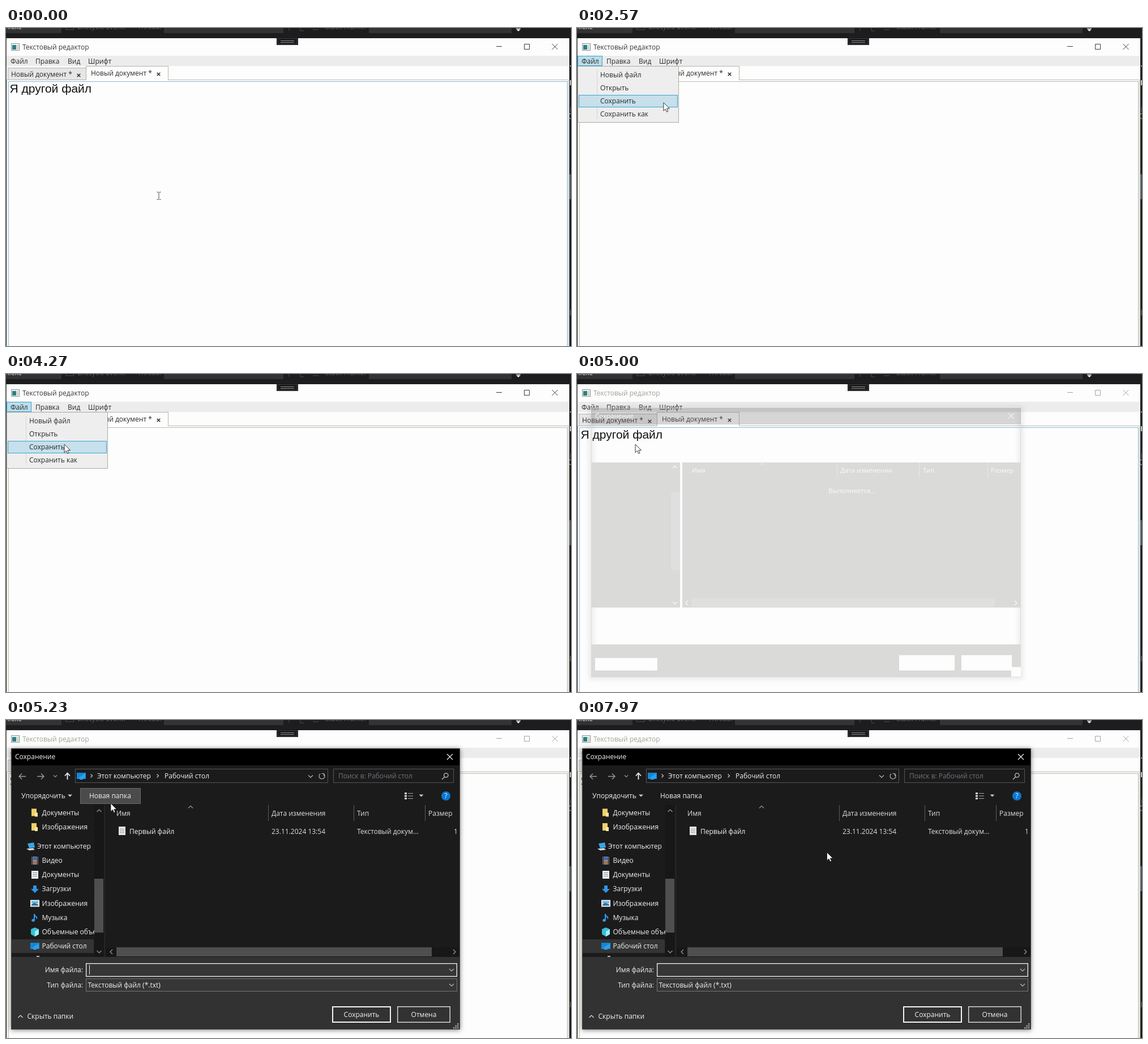
These frames come from a looping animation (998x561 px, 8000 ms). An HTML page:

```html
<!DOCTYPE html>
<html lang="ru">
<head>
<meta charset="utf-8">
<title>Текстовый редактор</title>
<style>
html, body { margin: 0; width: 100%; height: 100%; overflow: hidden; background: #1d1d1f; }
svg { display: block; position: absolute; left: 0; top: 0; }
text { font-family: "Open Sans", "Noto Sans", sans-serif; white-space: pre; }
.doc { font-family: "Liberation Sans", Arial, sans-serif; }
</style>
</head>
<body>
<svg id="stage" width="998" height="561" viewBox="0 0 998 561"></svg>
<script>
const LOOP = 8000;
const MENU_OPEN = 1730, MENU_CLOSE = 4640, DIALOG = 4930, READY = 5050, SHOWN = 5200;

const rect = (x, y, w, h, fill, stroke, sw = 1) => stroke
  ? `<rect x="${x + sw / 2}" y="${y + sw / 2}" width="${w - sw}" height="${h - sw}" fill="${fill}" stroke="${stroke}" stroke-width="${sw}"/>`
  : `<rect x="${x}" y="${y}" width="${w}" height="${h}" fill="${fill}"/>`;
const path = (d, stroke, sw = 1, fill = 'none') =>
  `<path d="${d}" fill="${fill}" stroke="${stroke}" stroke-width="${sw}"/>`;
const shape = (d, fill) => `<path d="${d}" fill="${fill}"/>`;
// cy is the vertical middle of the line
const text = (x, cy, s, fill, anchor = 'start', size = 12) =>
  `<text x="${x}" y="${Math.round(cy + 4.2)}" fill="${fill}" font-size="${size}" text-anchor="${anchor}">${s}</text>`;
const group = (id, body) => `<g id="${id}">${body}</g>`;
const cross = (x, y, r, c, sw = 1) => path(`M${x - r} ${y - r}l${2 * r} ${2 * r}m0 ${-2 * r}l${-2 * r} ${2 * r}`, c, sw);
const chevron = (x, y, dir, c, r = 4, sw = 1.2) => path({
  up: `M${x - r} ${y + r / 2}l${r} ${-r}l${r} ${r}`,
  down: `M${x - r} ${y - r / 2}l${r} ${r}l${r} ${-r}`,
  left: `M${x + r / 2} ${y - r}l${-r} ${r}l${r} ${r}`,
  right: `M${x - r / 2} ${y - r}l${r} ${r}l${-r} ${r}`
}[dir], c, sw);
const triangle = (x, y, c) => shape(`M${x - 4} ${y - 2}h8l-4 4z`, c);

const MENUS = [['Файл', 8, 1, 44], ['Правка', 52, 45, 57], ['Вид', 109, 102, 36], ['Шрифт', 145, 138, 55]];
const ITEMS = ['Новый файл', 'Открыть', 'Сохранить', 'Сохранить как'];
const itemY = i => 72 + 23 * i;

function backdrop() {
  const label = (x, s, c, anchor) => text(x, -2.5, s, c, anchor);
  return rect(0, 0, 998, 561, '#1d1d1f') +
    rect(0, 0, 98, 9, '#333336') + rect(279, 0, 211, 9, '#333336') + rect(641, 0, 252, 9, '#333336') +
    label(28, 'n.exe', '#e6e6e6', 'end') + label(126, 'Lifecycle Event.', '#5c5c5c') +
    label(232, 'Thread:', '#5c5c5c') + label(564, 'Stack Frame:', '#5c5c5c') +
    path('M105.5 0v3h14v-3M542 3h10M500 0v5M520 0v5h6', '#4c4c4c') +
    rect(901, 0, 8, 1, '#ddd') + triangle(905, 4, '#eee') +
    rect(995, 258, 3, 44, '#4d5c62') + rect(996, 92, 2, 9, '#c8c8c8') +
    rect(996, 66, 2, 2, '#999') + path('M998 151a4 4 0 0 0 0 9', '#c9c1a8') +
    rect(997, 140, 1, 8, '#7b3f8c') + rect(996, 497, 2, 10, '#4a4a4a');
}

function mainWindow() {
  const tab = (x, y, w, h, fill, tx, cy) => rect(x, y, w, h, fill, '#b4b6aa') +
    text(tx, cy, 'Новый документ *', '#2a2a2a') + cross(tx + 119.5, cy + 2, 2.8, '#222', 1.4);
  return rect(0, 18, 995, 543, '#fdfdfd') +
    rect(9, 27, 15, 13, '#f4f6f4', '#8a9292') + rect(11, 30, 7, 8, '#2c7f86') + rect(19, 30, 3, 8, '#c5d8c8') +
    `<g id="title">${text(29, 33.5, 'Текстовый редактор', 'currentColor')}` +
    path('M866 32.5h10M915.5 28.5h9v9h-9zM964.5 28l10 10m0-10l-10 10', 'currentColor') + '</g>' +
    rect(1, 49, 994, 18, '#ececec') +
    MENUS.map(([s, x, bx, w], i) => group('head' + i, rect(bx, 49, w, 18, '#bcdce9', '#3ba3cf')) +
      text(x, 59, s, '#2a2a2a')).join('') +
    path('M1.5 561V91.5H993.5V561', '#b9bbae') +
    tab(3, 70, 139, 22, '#e6e6e6', 9, 81.5) +
    tab(141, 67, 146, 25, '#fdfdfd', 150, 79.5) + rect(142, 91, 144, 1, '#fdfdfd') +
    '<rect id="edit" x="4.5" y="94.5" width="987" height="480" fill="#fdfdfd"/>' +
    '<text class="doc" x="6.5" y="114" font-size="21" fill="#111">Я другой файл</text>' +
    group('caret', rect(151, 96, 1, 23, '#111')) +
    rect(0, 18, 1, 543, '#4a4a4a') +
    rect(478, 17, 38, 13, '#161618') + rect(479, 18, 36, 11, '#1c1c1e', '#3c3c40') +
    path('M485 22.5h24M485 25.5h24', '#8b8b8b');
}

function dropDown() {
  return rect(1, 67, 179, 100, '#eeeeee', '#a9aba0') + rect(35, 74, 1, 87, '#d4d4e0') +
    ITEMS.map((s, i) => group('item' + i, rect(3, itemY(i), 175, 22, '#c6e0ec', '#3ba3cf')) +
      text(41, itemY(i) + 11, s, '#2a2a2a')).join('');
}

// half-painted dialog while it fades in
function ghost() {
  const w = '#fafafa', g = '#dadad9', bar = '#dfdfdf';
  const word = (x, y, s) => text(x, y, s, w, 'start', 11.5);
  return '<rect x="25" y="60" width="759" height="475" fill="none" stroke="#999" stroke-width="5" filter="url(#shadow)" opacity=".3"/>' +
    rect(25, 60, 759, 475, 'none', '#dedede') +
    '<rect x="25" y="60" width="759" height="29" fill="#777" opacity=".3"/>' +
    word(32, 74, 'Сохранение') + cross(767, 74, 5, w) +
    rect(25, 156, 157, 256, g) + rect(166, 209, 16, 137, bar) +
    chevron(173, 164, 'up', w) + chevron(173, 404, 'down', w) +
    rect(186, 156, 598, 256, g) + rect(202, 396, 536, 15, bar) +
    chevron(194, 404, 'left', w) + chevron(775, 404, 'right', w) + chevron(328, 159, 'up', '#e6e6e6') +
    path('M459.5 156v27M604.5 156v27M725.5 156v27', '#e8e8e8') +
    word(203, 170, 'Имя') + word(465, 170, 'Дата изменения') + word(611, 170, 'Тип') + word(731, 170, 'Размер') +
    word(444, 206, 'Выполняется...') +
    rect(25, 477, 759, 58, g) + rect(32, 501, 110, 22, '#fdfdfd') + rect(569, 496, 98, 27, '#fdfdfd') +
    rect(679, 496, 89, 27, '#fdfdfd') + rect(767, 517, 17, 17, '#fdfdfd');
}

const ICONS = {
  folder: (x, y) => shape(`M${x + 2} ${y - 7}h9v13h-9z`, '#f2cf68') + shape(`M${x + 8} ${y}h5v7h-5z`, '#ffe7a0'),
  pc: (x, y) => shape(`M${x + 1} ${y - 5}l11-2l2 9l-10 1z`, '#37a6e4') + shape(`M${x - 1} ${y + 4}l12-1l3 3l-10 1z`, '#d5dde3'),
  film: (x, y) => rect(x + 2, y - 7, 12, 14, '#8c8fa8') + rect(x + 5, y - 6, 6, 5, '#3b66b5') + rect(x + 5, y + 1, 6, 5, '#a8743a') +
    path(`M${x + 3.5} ${y - 7}v14M${x + 12.5} ${y - 7}v14`, '#26262c', 1.5),
  sheet: (x, y) => rect(x + 2, y - 7, 12, 14, '#e9edf0') + path(`M${x + 4} ${y - 3.5}h8m-8 3h8m-8 3h8`, '#7d93a8'),
  load: (x, y) => shape(`M${x + 5} ${y - 6}h6v6h4l-7 7l-7-7h4z`, '#2f95ea'),
  image: (x, y) => rect(x, y - 6, 16, 12, '#eef3f6') + rect(x + 2, y - 4, 12, 4, '#65b4e8') + shape(`M${x + 2} ${y + 4}v-2l5-3l7 3v2z`, '#2e6d98'),
  note: (x, y) => shape(`M${x + 6} ${y - 7}h2q0 3 4 5q1 3-1 5q0-4-3-5v6a3 2.5 0 1 1-2-2z`, '#2c9cf0'),
  cube: (x, y) => shape(`M${x + 8} ${y - 8}l7 3v9l-7 4l-7-4v-9z`, '#38bfd4') + shape(`M${x + 8} ${y - 1}l7-4v9l-7 4z`, '#a5ecf3'),
  desk: (x, y) => rect(x, y - 6, 16, 11, '#1485d8') + shape(`M${x + 2} ${y + 4}L${x + 15} ${y - 5}v9z`, '#29a2ef') + rect(x + 5, y + 5, 6, 1, '#65b7ec')
};
const NAV = [
  ['folder', 'Документы', 163.5], ['folder', 'Изображения', 189], ['pc', 'Этот компьютер', 223],
  ['film', 'Видео', 248], ['sheet', 'Документы', 273], ['load', 'Загрузки', 298], ['image', 'Изображения', 323.5],
  ['note', 'Музыка', 349], ['cube', 'Объемные объекты', 374], ['desk', 'Рабочий стол', 399]
];

function dialog() {
  const w = '#f1f1f1', dim = '#9a9a9a', line = '#56565c', bar = '#4f4f4f';
  const grip = [0, 1, 2].map(r => [0, 1, 2].filter(c => c + r > 1)
    .map(c => rect(790 + 3.5 * c, 535 + 3.5 * r, 2.4, 2.4, '#a5a5a5')).join('')).join('');
  const nav = NAV.map(([icon, s, y]) => {
    const root = icon === 'pc';
    return ICONS[icon](root ? 37 : 43, y) + text(root ? 55 : 63.5, y, s, w);
  }).join('');
  const columns = [[195, 'Имя'], [469, 'Дата изменения'], [620, 'Тип'], [746, 'Размер']];
  return '<rect x="9" y="51" width="793" height="496" filter="url(#shadow)" opacity=".5"/>' +
    rect(9, 50, 793, 496, '#1b1b1b') + rect(9, 50, 793, 30, '#000') +
    text(16, 65, 'Сохранение', w) + cross(784, 65, 5, w, 1.2) +
    // address row
    path('M35 99.5H23m5-5l-5 5l5 5M55 99.5h12m-5-5l5 5l-5 5', dim, 1.4) + chevron(87, 99, 'down', dim, 3) +
    path('M108.5 105V94m-4.5 4.5l4.5-5l4.5 5', w, 1.8) +
    rect(122, 86, 447, 25, '#1b1b1b', line) + ICONS.desk(125, 99) +
    chevron(151, 98.5, 'right', '#ccc', 3) + text(161, 98.5, 'Этот компьютер', w) +
    chevron(268, 98.5, 'right', '#ccc', 3) + text(280, 98.5, 'Рабочий стол', w) +
    chevron(538, 99.5, 'down', '#bbb') +
    path('M561 95a5 5 0 1 1-6 0M561.5 98.5v-4h-4', '#bbb', 1.2) +
    rect(578, 86, 213, 25, '#1b1b1b', line) + text(587, 99, 'Поиск в: Рабочий стол', '#74747a') +
    path('M774.5 100.5l-4.5 4.5M781 97.5a3.7 3.7 0 1 1-7.4 0a3.7 3.7 0 1 1 7.4 0', '#c4c4c4', 1.3) +
    // toolbar
    group('hover', rect(131, 120, 107, 28, '#4b4b4b', '#6a6a6a')) +
    text(27, 134, 'Упорядочить', w) + triangle(113, 133.5, '#ccc') + text(147, 134, 'Новая папка', w) +
    [0, 1, 2].map(i => rect(704, 128 + 4.5 * i, 4, 3, '#ddd') + rect(710, 129 + 4.5 * i, 9, 1, '#aaa')).join('') +
    triangle(733.5, 133.5, '#ccc') +
    '<circle cx="777" cy="134" r="8" fill="#0b77d3"/>' + text(777, 134, '?', '#fff', 'middle') +
    // folders
    rect(9, 387, 146, 24, '#343434') + `<g clip-path="url(#navClip)">${nav}${rect(54, 416, 5, 3, '#b5b5b5')}</g>` +
    rect(156, 150, 16, 268, '#171717') + rect(156, 280, 16, 95, bar) +
    chevron(164.5, 160, 'up', dim) + chevron(164.5, 409, 'down', dim) + rect(174, 150, 1, 268, '#2e2e2e') +
    // files
    path('M463.5 150v28M614.5 150v28M740.5 150v28', '#5c5c5c') + chevron(326, 153.5, 'up', dim) +
    columns.map(([x, s]) => text(x, 165, s, '#dedede')).join('') +
    rect(199, 188, 12, 15, '#e4e4e4') + path('M201 192.5h8m-8 3h8m-8 3h8', '#a0a0a0') +
    text(218, 196.5, 'Первый файл', w) + text(469, 196.5, '23.11.2024 13:54', '#dedede') +
    text(620, 196.5, 'Текстовый докум...', '#dedede') + text(791, 196.5, '1', '#dedede') +
    rect(176, 401, 625, 17, '#171717') + rect(195, 401, 557, 16, bar) +
    chevron(186, 409, 'left', dim) + chevron(792, 409, 'right', dim) +
    // name, type and buttons
    rect(9, 418, 793, 128, '#323232') +
    text(136, 441, 'Имя файла:', w, 'end') + rect(141, 429, 656, 24, '#363636', '#f2f2f2', 1.3) +
    chevron(787, 441, 'down', '#bbb') + group('nameCaret', rect(147, 432, 1, 17, '#eee')) +
    text(136, 467.5, 'Тип файла:', w, 'end') + rect(141, 456, 656, 23, '#363636', '#75757c') +
    text(144.5, 467.5, 'Текстовый файл (*.txt)', w) + chevron(787, 467.5, 'down', '#bbb') +
    chevron(25.5, 523, 'up', '#ddd') + text(37.5, 523, 'Скрыть папки', w) +
    rect(576, 505, 104, 29, '#323232', '#f4f4f4', 2) + text(628, 519.5, 'Сохранить', w, 'middle') +
    rect(691, 505, 94, 29, '#323232', '#d6d6d6', 1.5) + text(738, 519.5, 'Отмена', w, 'middle') +
    grip + rect(9, 50, 793, 496, 'none', '#3f3f3f');
}

const stage = document.getElementById('stage');
stage.innerHTML = `<defs>
  <clipPath id="navClip"><rect x="9" y="150" width="147" height="268"/></clipPath>
  <clipPath id="page"><rect width="998" height="561"/></clipPath>
  <filter id="shadow" x="-5%" y="-5%" width="110%" height="110%"><feGaussianBlur stdDeviation="4"/></filter>
  </defs><g clip-path="url(#page)">` +
  backdrop() + mainWindow() + group('menu', dropDown()) + group('ghost', ghost()) + group('dialog', dialog()) +
  group('beam', path('M-3.5-6.5h2.5l1 1l1-1h2.5M0-5.5v11M-3.5 6.5h2.5l1-1l1 1h2.5', '#4c4c4c')) +
  group('arrow', path('M0 0V14.5L3.4 11.3L5.7 16.4L8 15.3L5.8 10.4H10.5Z', '#222', 0.9, '#fff')) + '</g>';

const el = {};
stage.querySelectorAll('[id]').forEach(n => el[n.id] = n);
// display also hides children that set their own visibility
const show = (id, on) => el[id].setAttribute('display', on ? 'inline' : 'none');
const clamp = v => Math.max(0, Math.min(1, v));
const zoom = (id, s) => el[id].setAttribute('transform', `translate(405 298) scale(${s}) translate(-405 -298)`);

// pointer stops: time, x, y
const TRACK = [
  [0, 270, 296], [250, 270, 296], [790, 122, 86], [1100, 62, 62], [1520, 28, 57], [1750, 28, 57],
  [2150, 62, 88], [2530, 150, 130], [2670, 164, 138], [2830, 164, 138], [3250, 15, 48], [3400, 15, 48],
  [4030, 103, 124], [5000, 103, 124], [5210, 185, 147], [5300, 185, 147], [6450, 519, 464],
  [6600, 519, 464], [7960, 441.5, 233.5], [LOOP, 441.5, 233.5]
];
function pointer(t) {
  const i = Math.max(1, TRACK.findIndex(k => k[0] > t));
  const [t0, x0, y0] = TRACK[i - 1], [t1, x1, y1] = TRACK[i];
  const p = (t - t0) / (t1 - t0), e = p * p * (3 - 2 * p);
  return [x0 + (x1 - x0) * e, y0 + (y1 - y0) * e];
}

function draw(t) {
  const [x, y] = pointer(t);
  const menu = t >= MENU_OPEN && t < MENU_CLOSE;
  const active = t < DIALOG;
  const inside = y > 94 && !menu && t < READY;
  const blink = from => (t - from + 2 * LOOP * 1060) % 1060 < 530;

  el.title.setAttribute('color', active ? '#3a3a3a' : '#a3a398');
  el.edit.setAttribute('stroke', inside ? '#86b9de' : '#b9bbae');
  show('caret', t < MENU_CLOSE && blink(330));
  MENUS.forEach(([, , bx, w], i) => {
    const over = active && y >= 49 && y < 67 && x >= bx && x < bx + w;
    show('head' + i, menu ? i === 0 : over);
  });
  show('menu', menu);
  ITEMS.forEach((s, i) => show('item' + i, x > 3 && x < 178 && y >= itemY(i) && y < itemY(i) + 23));

  const fade = clamp((t - READY) / (SHOWN - READY));
  show('ghost', t >= DIALOG && t < READY);
  el.ghost.setAttribute('opacity', clamp((t - DIALOG) / 60));
  zoom('ghost', 1 + 0.00008 * (t - 5000));
  show('dialog', t >= READY);
  el.dialog.setAttribute('opacity', 0.3 + 0.7 * fade);
  zoom('dialog', 0.965 + 0.035 * fade);
  show('hover', x > 131 && x < 238 && y > 120 && y < 148);
  show('nameCaret', blink(5200));

  const beam = inside && active;
  show('beam', beam);
  show('arrow', !beam);
  const at = `translate(${x.toFixed(1)} ${y.toFixed(1)})`;
  el.beam.setAttribute('transform', at);
  el.arrow.setAttribute('transform', at);
}

const start = performance.now();
function tick() {
  draw((performance.now() - start) % LOOP);
  requestAnimationFrame(tick);
}
tick();
</script>
</body>
</html>
```
